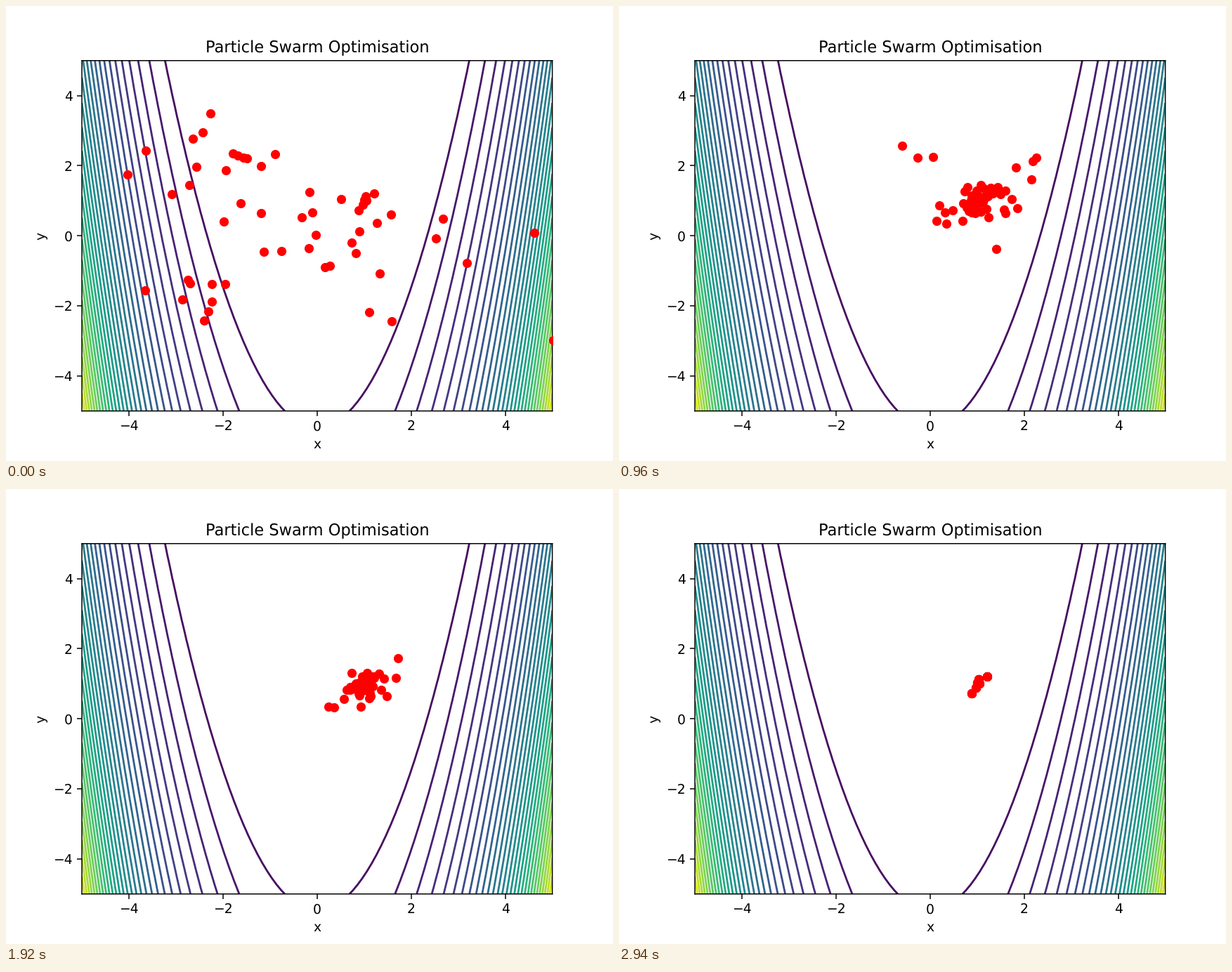
Write a matplotlib script that moves like this. It is 864 px wide and 648 px high and loops after 2970 ms.

```python
import numpy as np
import matplotlib.pyplot as plt
from matplotlib.animation import FuncAnimation

plt.rcParams.update({"text.hinting": "none", "path.snap": False})

FRAMES, STEP_MS, COUNT = 99, 30, 50
LAST = FRAMES - 1
rng = np.random.default_rng(11)

# Where the swarm settles, around the minimum at (1, 1)
SETTLED = np.array([(1.21, 1.21), (1.04, 1.12), (1.05, 1.0), (0.98, 0.88),
                    (0.89, 0.73), (1.0, 1.03)])

# Starting groups: centre, spread, number of particles
GROUPS = [
    ((-2.3, 2.4), (0.9, 0.8), 16),
    ((-0.6, 0.3), (0.8, 0.9), 12),
    ((-2.6, -1.8), (0.6, 0.7), 9),
    ((1.2, -1.0), (0.3, 0.9), 8),
    ((3.2, -0.5), (0.9, 1.4), 5),
]

start = np.vstack([rng.normal(c, s, (n, 2)) for c, s, n in GROUPS])
home = SETTLED[np.arange(COUNT) % len(SETTLED)]

# Each particle swings around its home and calms down at its own rate
size = rng.rayleigh(1.1, (COUNT, 1))
life = rng.lognormal(np.log(30), 0.5, (COUNT, 1))
period = rng.uniform(7, 14, (COUNT, 2))
phase = rng.uniform(0, 2 * np.pi, (COUNT, 2))


def swarm(t):
    pull = np.exp(-t / 9)
    onset = 1 - np.exp(-t / 3)
    fade = 1 - (t / LAST) ** 6
    swing = np.sin(2 * np.pi * t / period + phase)
    swing *= size * np.exp(-t / life) * onset * fade
    return home + (start - home) * pull + swing


fig, ax = plt.subplots(figsize=(6.4, 4.8), dpi=135)
grid = np.linspace(-5, 5, 100)
X, Y = np.meshgrid(grid, grid)
ax.contour(X, Y, (1 - X) ** 2 + 100 * (Y - X ** 2) ** 2, 30, cmap="viridis")
ax.set(xlim=(-5, 5), ylim=(-5, 5), xlabel="x", ylabel="y",
       title="Particle Swarm Optimisation")

ax.plot(*SETTLED.T, "ro", zorder=3)
dots, = ax.plot([], [], "ro", zorder=3)


def update(frame):
    dots.set_data(*swarm(frame).T)
    return dots,


anim = FuncAnimation(fig, update, frames=FRAMES, interval=STEP_MS, repeat=True)
plt.show()
```
